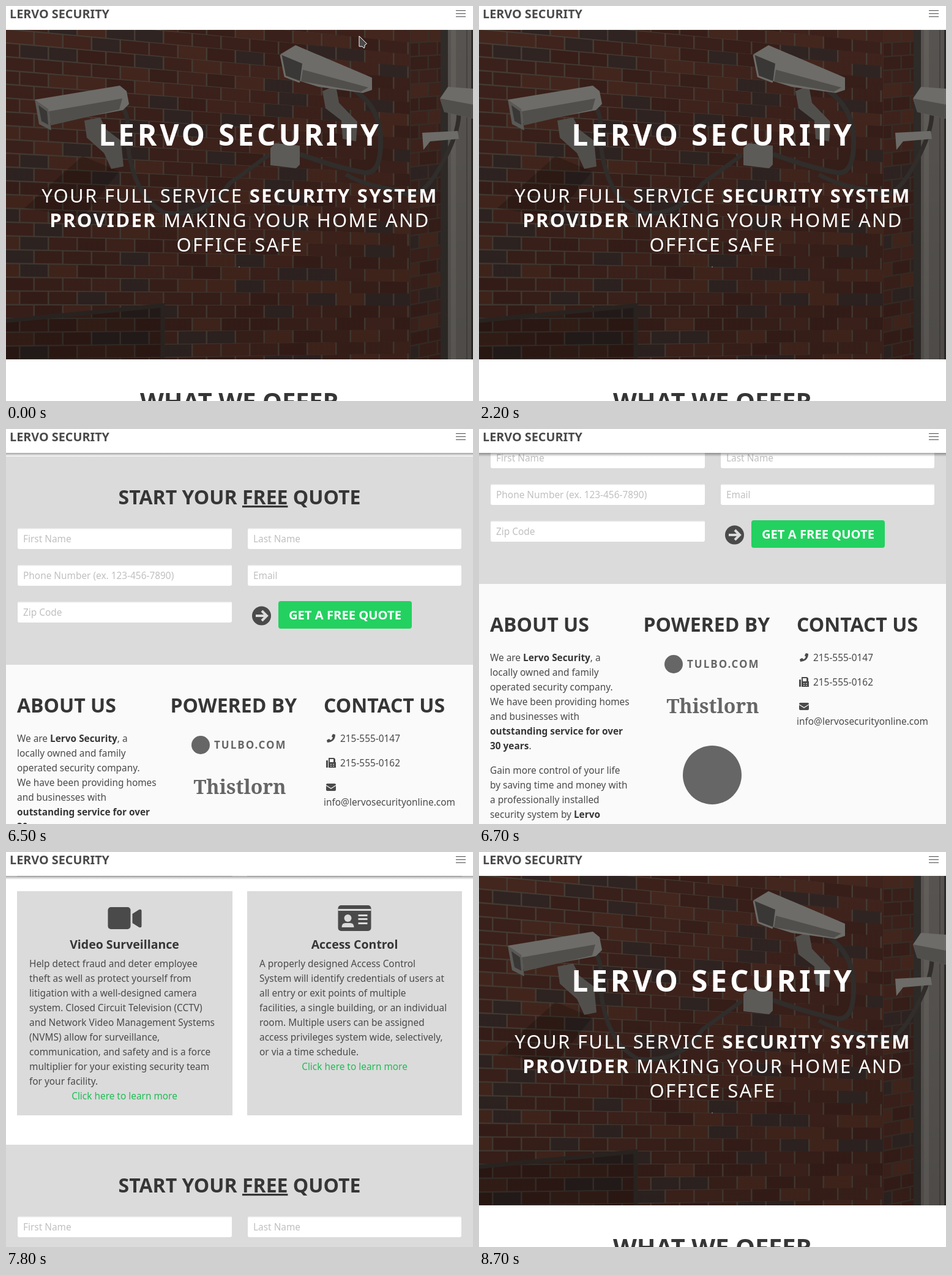
Recreate the animation shown at these times as an HTML page. Size 763 px wide and 645 px high, loop 9500 ms.

```html
<!DOCTYPE html>
<html lang="en">
<head>
<meta charset="utf-8">
<title>Lervo Security</title>
<style>
html, body { margin: 0; height: 100%; overflow: hidden; background: #fff; }
svg { display: block; width: 100vw; height: 100vh; }
text { font-family: "Noto Sans", "Open Sans", sans-serif; white-space: pre; }
.b { font-weight: 700; }
</style>
</head>
<body>
<svg id="stage" viewBox="0 0 763 645"></svg>
<script>
const LOOP = 9500, GREY = '#dbdbdb', INK = '#4a4a4a', DARK = '#363636', GREEN = '#23d160', LINK = '#20bc56';
// Scroll offsets of the three lower views
const CARDS = 1828, FORM = CARDS + 272, FOOT = FORM + 293;

const text = (x, y, s, size = 15.4, more = '') =>
  `<text x="${x}" y="${y}" font-size="${size}" fill="${INK}" ${more}>${s}</text>`;
const bold = (x, y, s, size, more = '') =>
  text(x, y, s, size, `class="b" style="fill:${DARK}" ${more}`);
const mid = 'text-anchor="middle"';
const rect = (x, y, w, h, fill, r = 0) =>
  `<rect x="${x}" y="${y}" width="${w}" height="${h}" rx="${r}" fill="${fill}"/>`;
const path = (d, fill = INK) => `<path d="${d}" fill="${fill}"/>`;
const line = (d, color, w) => `<path d="${d}" fill="none" stroke="${color}" stroke-width="${w}"/>`;
const circle = (x, y, r, fill) => `<circle cx="${x}" cy="${y}" r="${r}" fill="${fill}"/>`;
const at = (x, y, s, more = '') => `<g transform="translate(${x} ${y})" ${more}>${s}</g>`;
const lines = (x, y, s, step = 24, size) =>
  s.split('|').map((t, i) => text(x, y + i * step, t, size)).join('');

const icons = {
  phone: path('M11 1l4 1q0 12-13 13l-1-4 4-2 2 2q3-1 4-4l-2-2z'),
  mail: rect(0, 2, 16, 12, INK, 2) + line('M0 5l8 5 8-5', '#fafafa', 1.2),
  fax: rect(0, 4, 3, 12, INK, 1) + path('M4 0h9l2 2v5h1v9H4z') +
    path('M6 2h6v5H6zM7 10h2v1H7zM11 10h2v1h-2zM7 13h2v1H7zM11 13h2v1h-2z', '#fafafa'),
  // Card icons are centred on x = 0
  video: rect(-27, 3, 37, 36, INK, 5) + path('M13 14l11-7q4-1 4 2v25q0 3-4 2l-11-7z'),
  badge: rect(-27, 0, 54, 42, INK, 5) + rect(-27, 6, 54, 3, GREY) +
    circle(-11, 21, 6, GREY) + path('M-21 36q0-7 6-7h8q6 0 6 7z', GREY) +
    rect(6, 15, 15, 3, GREY) + rect(6, 21, 15, 3, GREY) + rect(6, 28, 15, 3, GREY),
  house: path('M0 1l27 21h-6v20H5V28H-5v14h-16V22h-6z'),
  flame: path('M-3 0q19 13 17 29-2 13-14 13t-14-13q0-9 7-16 1 5 4 6 4-9 0-19z'),
  mobile: rect(-13, 0, 26, 42, INK, 4) + rect(-10, 5, 20, 28, GREY)
};

// Brick wall
let seed = 4711;
const rnd = () => (seed = seed * 16807 % 2147483647) / 2147483647;
function wall(x0, x1, len, tilt) {
  const tones = ['#3a201a', '#3f231c', '#371e19', '#3c211b', '#43261d', '#2f2422'], paths = tones.map(() => '');
  for (let r = -4; r < 27; r++) {
    const y = 39 + r * 22.5, slope = tilt(y), h = 20;
    const yAt = x => (y + (x - x0) * slope).toFixed(1);
    for (let x = x0 - (r & 1) * len / 2; x < x1; x += len) {
      const a = Math.max(x, x0), b = Math.min(x + len - 2.5, x1);
      if (b > a) paths[rnd() * tones.length | 0] += `M${a} ${yAt(a)}L${b} ${yAt(b)}v${h}L${a} ${+yAt(a) + h}z`;
    }
  }
  return paths.map((d, i) => path(d, tones[i])).join('');
}

function hero() {
  const metal = '#6d6c68', shade = '#514f4c', cable = '#302d2b';
  const photo = rect(0, 39, 763, 538, '#443b33') +
    wall(0, 660, 47, y => .09 - (y - 39) * .0002) +
    rect(660, 39, 60, 538, '#382d27') + wall(661, 712, 30, y => -.05 - (y - 39) * .0003) +
    rect(710, 39, 53, 538, '#2f2b28') + rect(722, 39, 38, 538, '#565350') +
    rect(727, 39, 8, 538, '#615e5a') + rect(752, 39, 2, 538, '#454240') +
    rect(0, 39, 763, 538, 'url(#dusk)') +
    path('M30 330L125 245l60 25-60 75z', '#0003') +
    path('M0 517L256 490v87H0z', '#0003') + line('M0 514L256 489v88', '#292320', 7) +
    line('M190 165Q202 180 198 215Q205 310 260 338Q330 345 365 290L430 243', cable, 7) +
    line('M570 138Q610 165 612 215Q614 276 585 272Q545 265 480 242', cable, 8) +
    line('M740 178Q738 215 705 270T640 300Q590 295 555 275', cable, 7) +
    path('M432 232l8-8 40 4v31l-6 6-42-5z', '#5c5b58') +
    path('M128 187l26-5 10 20 24 18 4 42-20 4-12-26-28-25z', shade) +
    path('M47 153L186 130l11 9 4 21-10 10-118 22z', metal) +
    path('M47 153l22 15 5 35-20-10z', '#5a5956') + path('M53 162l14 10 2 22-11-6z', '#393836') +
    path('M70 172l120-21-5 18-112 26z', shade) +
    path('M517 139l22-9 5 28 30 31-2 32-22-4-2-30-26-20z', shade) +
    path('M448 79l25-15 125 53v20l-15 5-72-10-55-17z', metal) +
    path('M448 79l36 15-4 31-24-10z', '#3a3836') + line('M449 80l7 35 24 9', metal, 3) +
    path('M485 104l107 29-12 7-98-17z', shade) +
    path('M680 207l58-3 2 13-47 4-11 14z', metal) +
    path('M709 151l13-19 41 3v49l-47-11z', metal) + path('M709 151l54 10v23l-47-11z', shade);
  const sub = (y, s) => text(382, y, s, 31, mid + ' style="fill:#fff;letter-spacing:2.3px"');
  const strong = s => `<tspan class="b">${s}</tspan>`;
  return `<g clip-path="url(#photo)">${photo}</g>` +
    text(382.5, 228, 'LERVO SECURITY', 48, mid + ' class="b" style="fill:#fff;letter-spacing:4.8px"') +
    sub(321, 'YOUR FULL SERVICE ' + strong('SECURITY SYSTEM')) +
    sub(361, strong('PROVIDER') + ' MAKING YOUR HOME AND') +
    sub(401, 'OFFICE SAFE') + circle(381, 426, .8, '#aaa') +
    bold(381.5, 660, 'WHAT WE OFFER', 40.2, mid);
}

function cardRow(y, h, ...items) {
  return items.map(([icon, title, body], i) => {
    const x = i ? 394 : 18, n = body.split('|').length;
    return at(x, y, rect(0, 0, i ? 351 : 352, h, GREY) + at(175.5, 23, icons[icon]) +
      bold(175.5, 94, title, 19.5, mid) + lines(20, 124, body) +
      text(175.5, 124 + n * 24, 'Click here to learn more', 15.4, `${mid} style="fill:${LINK}"`));
  }).join('');
}

function cards() {
  const burglar = 'Protect what matters most with a|well-designed alarm system. Sensors on|doors and windows detect a break-in|and alert our monitoring center at any|time of the day or night, so that help|can be sent right away.';
  const fire = 'Smoke and heat detectors give an early|warning and notify the fire department|even when nobody is there. Systems are|installed, tested and inspected by our|trained team.';
  return bold(381.5, -1073, 'Home Security', 28, mid) +
    cardRow(-1038, 318, ['house', 'Burglar', burglar], ['flame', 'Fire', fire]) +
    cardRow(-696, 318,
      ['video', 'Cameras', 'See what is happening at home from|anywhere. Indoor and outdoor cameras|record clear video by day and night|and keep it ready for you to view.'],
      ['mobile', 'Interactive Services', 'Control your system from your phone.|Arm or disarm, lock doors, adjust lights|and receive alerts wherever you are.']) +
    bold(381.5, -338, 'Business Security', 28, mid) +
    cardRow(-278, 318, ['house', 'Burglar', burglar], ['flame', 'Fire', fire]) +
    cardRow(64, 366,
      ['video', 'Video Surveillance', 'Help detect fraud and deter employee|theft as well as protect yourself from|litigation with a well-designed camera|system. Closed Circuit Television (CCTV)|and Network Video Management Systems|(NVMS) allow for surveillance,|communication, and safety and is a force|multiplier for your existing security team|for your facility.'],
      ['badge', 'Access Control', 'A properly designed Access Control|System will identify credentials of users at|all entry or exit points of multiple|facilities, a single building, or an individual|room. Multiple users can be assigned|access privileges system wide, selectively,|or via a time schedule.']);
}

function form() {
  const field = (x, y, s) => at(x, y, rect(0, 0, x > 99 ? 349 : 350, 34, '#fff', 3) +
    rect(1, 0, 347, 1.5, '#ececec') + text(9, 23, s, 15.4, 'style="fill:#c0c0c0"'));
  return rect(0, 206, 763, 340, GREY) +
    bold(381.5, 284, 'START YOUR <tspan text-decoration="underline">FREE</tspan> QUOTE', 32, mid) +
    field(19, 323, 'First Name') + field(395, 323, 'Last Name') +
    field(19, 383, 'Phone Number (ex. 123-456-7890)') + field(395, 383, 'Email') +
    field(19, 443, 'Zip Code') +
    circle(417.5, 466, 15.5, INK) + line('M408 466h17M418 458l8 8-8 8', GREY, 4) +
    rect(445, 442, 218, 45, GREEN, 4) +
    text(554, 472, 'GET A FREE QUOTE', 20.2, mid + ' class="b" style="fill:#fff"');
}

function footer() {
  const b = s => `<tspan class="b" fill="${DARK}">${s}</tspan>`, mark = '#666';
  return rect(0, 253, 763, 900, '#fafafa') +
    bold(18, 331, 'ABOUT US', 32) + bold(268.5, 331, 'POWERED BY', 32) + bold(519, 331, 'CONTACT US', 32) +
    lines(18, 379, `We are ${b('Lervo Security')}, a|locally owned and family|operated security company.|We have been providing homes|and businesses with|${b('outstanding service for over')}|${b('30 years')}.`) +
    lines(18, 563, `Gain more control of your life|by saving time and money with|a professionally installed|security system by ${b('Lervo')}|${b('Security')}.`) +
    circle(318, 384, 15, mark) +
    text(340, 390, 'TULBO.COM', 17, `class="b" style="fill:${mark};letter-spacing:2px"`) +
    text(382, 464, 'Thistlorn', 32, `${mid} class="b" style="fill:${mark};font-family:'Noto Serif',serif"`) +
    circle(381, 565, 48, mark) +
    at(523, 365, icons.phone) + text(546, 379, '215-555-0147') +
    at(523, 405, icons.fax) + text(546, 419, '215-555-0162') +
    at(523, 445, icons.mail) + text(519, 483, 'info@lervosecurityonline.com');
}

function menu() {
  const chevron = y => line(`M740 ${y}l6 6 6-6`, LINK, 2.6);
  return rect(0, 39, 763, 584, '#fff') + rect(0, 623, 763, 7, 'url(#shadow)') +
    text(6, 73, 'Home Security') + chevron(66) +
    lines(18, 118, 'Burglar|Fire|Cameras|Interactive Services', 37, 13.4) +
    text(6, 277, 'Business Security') + chevron(270) +
    lines(18, 322, 'Burglar|Fire|Video Surveillance|Access Control', 37, 13.4) +
    lines(6, 481, 'About|Contact', 40) +
    at(10, 547, icons.phone) + text(34, 561, '215-555-0147') +
    at(10, 587, icons.mail) + text(34, 601, 'info@lervosecurityonline.com');
}

const fade = (id, a, b) => `<linearGradient id="${id}" x2="0" y2="1"><stop stop-color="#000" stop-opacity="${a}"/><stop offset="1" stop-color="#000" stop-opacity="${b}"/></linearGradient>`;
const $ = id => document.getElementById(id);
$('stage').innerHTML =
  `<defs>${fade('shadow', .36, 0)}${fade('dusk', 0, .1)}<clipPath id="photo"><rect y="39" width="763" height="538"/></clipPath></defs>` +
  `<g id="page">${hero()}${at(0, CARDS, cards())}${at(0, FORM, form())}${at(0, FOOT, footer())}</g>` +
  `<g id="shade">${rect(0, 39, 763, 6, 'url(#shadow)')}</g>` + rect(0, 0, 763, 39, '#fff') +
  `<g id="menu">${menu()}</g><g id="hover">${rect(717, 0, 46, 39, '#f2f2f2')}</g>` +
  text(6, 20, 'LERVO SECURITY', 19.8, 'class="b"') +
  `<path id="burger" fill="none" stroke="${INK}"/>` +
  `<g id="cursor" fill="${INK}" stroke="#fff" stroke-linejoin="round">
    <path id="arrow" d="M0 0V17H5L8 20 9 18V15L12.5 12.5Z"/>
    <path id="hand" d="M-3 1q2-2 4 0v5l5 1q2 1 2 3v6l-2 5h-9l-6-7q-1-3 2-2l4 2z"/></g>`;

function scrollAt(t) {
  if (t < 6100 || t >= 8700) return 0;
  if (t >= 8400) return 600;
  if (t >= 8200) return 1200;
  if (t >= 8000) return CARDS - 130;
  if (t >= 7800) return CARDS;
  if (t >= 7300 || t < 6400) return FORM;
  const u = Math.min(7, Math.floor((t - 6300) / 100)) / 7;
  return Math.round(FORM + 407.4 * (1 - (1 - u) ** 1.5));
}

const show = (id, on) => $(id).setAttribute('visibility', on ? 'visible' : 'hidden');
function draw(t) {
  const y = scrollAt(t), open = t >= 1000 && t < 2000, over = t >= 700 && t < 2200;
  const u = Math.max(0, Math.min(5, Math.floor((t - 200) / 100))) / 5;
  $('page').setAttribute('transform', `translate(0 ${-y})`);
  $('cursor').setAttribute('transform', `translate(${577 + 164 * u} ${49 - 37 * u})`);
  $('burger').setAttribute('d', open ? 'M737.5 7.5l11 11M748.5 7.5l-11 11' : 'M735 7.5h16M735 12.5h16M735 17.5h16');
  show('shade', y > 0);
  show('menu', open);
  show('hover', over);
  show('arrow', t < 700);
  show('hand', over);
}

const start = performance.now();
function tick() {
  draw((performance.now() - start) % LOOP);
  requestAnimationFrame(tick);
}
tick();
</script>
</body>
</html>
```
